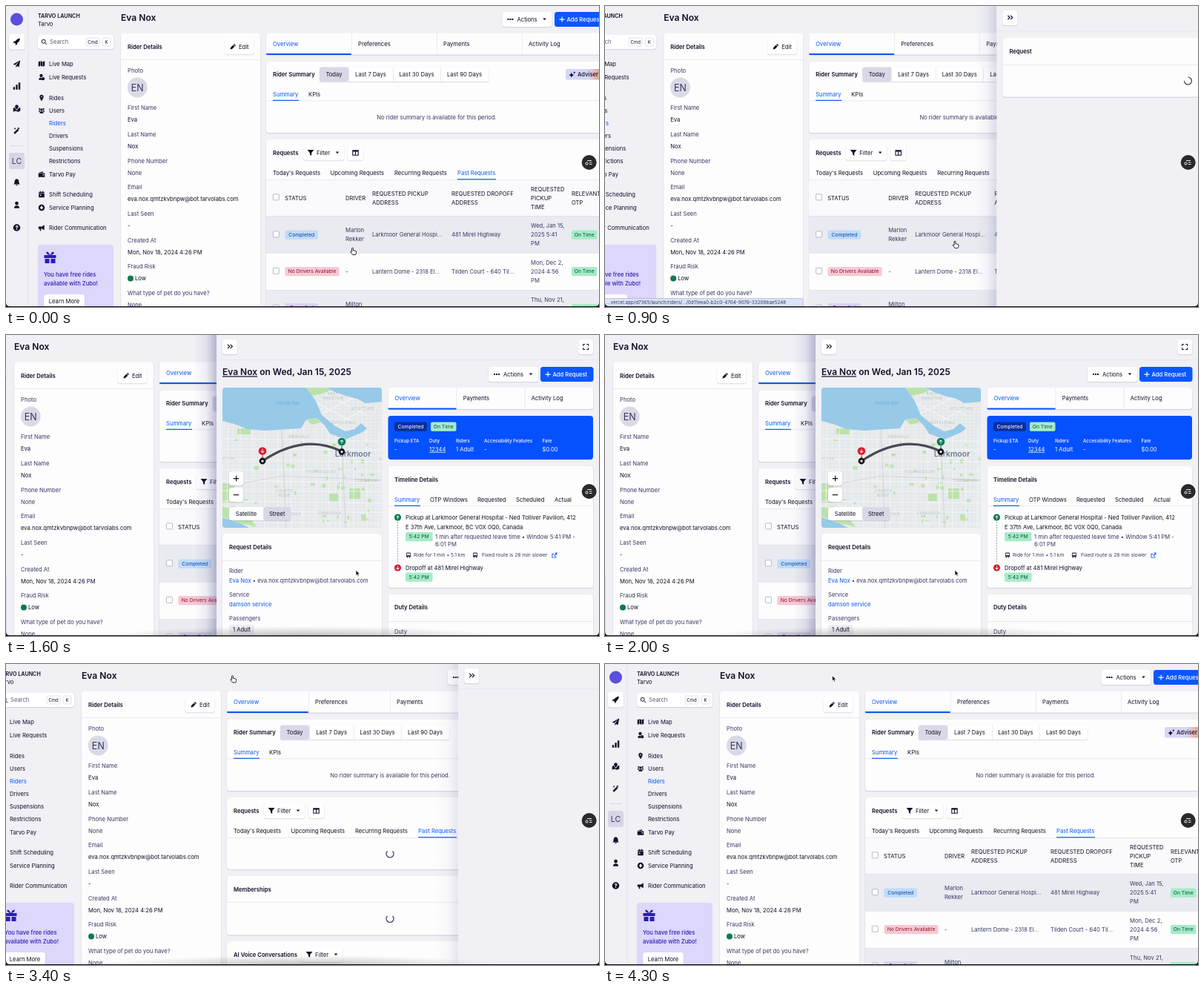
Recreate the animation shown at these times as an HTML page. Size 800 px wide and 406 px high, loop 4.4 s.

```html
<!DOCTYPE html>
<html lang="en">
<head>
<meta charset="utf-8">
<title>Rider details</title>
<style>
html, body { margin: 0; width: 100%; height: 100%; overflow: hidden; background: #f0f0f5; }
svg { display: block; width: 100vw; height: 100vh; }
text { font-family: Inter, "Open Sans", sans-serif; white-space: pre; }
</style>
</head>
<body>
<svg id="stage" viewBox="0 0 800 406" xmlns="http://www.w3.org/2000/svg"></svg>
<script>
const LOOP = 4400, STEP = 100, OPEN_X = 284, PUSH = 144;
const INK = '#0f1026', SOFT = '#36395f', BLUE = '#0b57f0', LINE = '#e1e2ea', BG = '#f0f0f5';
const NAME = 'Eva Nox', MAIL = 'eva.nox.qmtzkvbnpw@bot.tarvolabs.com';

const ICONS = {
  rocket: 'M15 1C10 1 7 4 5 7H2L0 11l3-.5 3 3L5 16l4-2v-3c3-2 6-5 6-10z',
  send: 'M16 0 0 9l4 2 9-8-7 9v4l3-3 4 2z',
  bars: 'M0 10h4v6H0zM6 5h4v11H6zM12 0h4v16h-4z',
  mapPin: 'M8 0a4 4 0 0 1 4 4q0 2-4 7Q4 6 4 4a4 4 0 0 1 4-4zM0 8l3-2 5 7 5-6 3-1v8l-5 2-6-2-5 2z',
  wand: 'M1 13 10 4l3 3-9 9zM12 0l1 2 2 1-2 1-1 2-1-2-2-1 2-1zM4 1l.8 1.7 1.7.8-1.700.8L4 6l-.8-1.700L1.500 3.500l1.700-.8z',
  bell: 'M8 0q5 1 5 7 0 3 2 5H1q2-2 2-5 0-6 5-7zM6 13h4q-2 4-4 0z',
  agent: 'M8 1a4 4 0 1 1 0 8 4 4 0 0 1 0-8zM2 16q0-6 6-6t6 6z',
  help: 'M8 0a8 8 0 1 1 0 16A8 8 0 0 1 8 0zM5 6h2q1-2 2 0L7 8v2h2V8.500Q12 7 11 4.500 8 1 5 4.500zM7 11v2h2v-2z',
  map: 'M0 3l5-2v12l-5 2zM6 1l4 2v12l-4-2zM11 3l5-2v12l-5 2z',
  live: 'M7 0a4 4 0 1 1 0 8 4 4 0 0 1 0-8zM1 15q0-6 6-6l2 6zM12 8a4 4 0 1 1 0 8 4 4 0 0 1 0-8z',
  pin: 'M8 0a5 5 0 0 1 5 5q0 3-5 11Q3 8 3 5a5 5 0 0 1 5-5zM8 3.500a1.500 1.500 0 1 0 0 3 1.500 1.500 0 0 0 0-3z',
  users: 'M8 3a3 3 0 1 1 0 6 3 3 0 0 1 0-6zM3 15q0-5 5-5t5 5zM3 2a2 2 0 1 1 0 4 2 2 0 0 1 0-4zM13 2a2 2 0 1 1 0 4 2 2 0 0 1 0-4zM0 11q0-4 4-4l1 2-2 2zM16 11q0-4-4-4l-1 2 2 2z',
  card: 'M0 4l11-3 1 3zM0 5h16v10H0zM11 8v3h3V8z',
  calendar: 'M1 2h3V0h2v2h4V0h2v2h3v3H1zM1 6h14v10H1zM4 9v3h3V9z',
  gear: 'M8 0a8 8 0 1 1 0 16A8 8 0 0 1 8 0zM8 3 4 8l4 5 4-5z',
  horn: 'M15 1v13l-6-3H6l1 5H4l-1-5H0V5h9z',
  gift: 'M0 5h16v4H0zM1 10h6v6H1zM9 10h6v6H9zM8 5Q2 4 3 1q2-2 5 4 3-6 5-4 1 3-5 4z',
  pencil: 'M1 15l1-5 7-7 4 4-7 7zM10 2l2-2 4 4-2 2z',
  filter: 'M0 1h16l-6 7v7l-4-3V8z',
  caret: 'M2 4h12l-6 7z',
  columns: 'M0 1h16v14H0zM2 5v8h5V5zM9 5v8h5V5z',
  spark: 'M6 3l2 4 4 2-4 2-2 4-2-4-4-2 4-2zM13 0l1 2 2 1-2 1-1 2-1-2-2-1 2-1z',
  bus: 'M3 0h10q2 0 2 3v10h-2v3h-3v-3H6v3H3v-3H1V3q0-3 2-3zM3 3v5h10V3z',
  ext: 'M9 0h7v7l-2-2-6 6-2-2 6-6zM0 3h6v2H2v9h9v-4h2v6H0z',
  expand: 'M0 0h6v2H2v4H0zM10 0h6v6h-2V2h-4zM0 10h2v4h4v2H0zM14 10h2v6h-6v-2h4z',
  plus: 'M7 0h2.500v7H16v2.500H9.500V16H7V9.500H0V7h7z',
  minus: 'M0 7h16v2.500H0z',
  dots: 'M0 6h4v4H0zM6 6h4v4H6zM12 6h4v4h-4z',
  up: 'M8 1l6 6-1.500 1.500L9 5v10H7V5L3.500 8.500 2 7z',
  down: 'M8 15l6-6-1.500-1.500L9 11V1H7v10L3.500 7.500 2 9z'
};

const rect = (x, y, w, h, fill, r = 0, more = '') =>
  `<rect x="${x}" y="${y}" width="${w}" height="${h}" rx="${r}" fill="${fill}" ${more}/>`;
const circle = (x, y, r, fill, more = '') => `<circle cx="${x}" cy="${y}" r="${r}" fill="${fill}" ${more}/>`;
const path = (d, stroke, w = 1, more = '') => `<path d="${d}" fill="none" stroke="${stroke}" stroke-width="${w}" ${more}/>`;
const shape = (d, fill) => `<path d="${d}" fill="${fill}"/>`;
// y is the middle of the line
const text = (x, y, s, { c = INK, z = 7.65, w = 400, a = 'start', more = '' } = {}) =>
  `<text x="${x}" y="${y + z * .364}" fill="${c}" font-size="${z}" font-weight="${w}" text-anchor="${a}" ${more}>${s}</text>`;
const bold = (x, y, s) => text(x, y, s, { w: 600 });
const icon = (n, x, y, s = 9, c = INK) =>
  `<path d="${ICONS[n]}" fill="${c}" fill-rule="evenodd" transform="translate(${x - s / 2} ${y - s / 2}) scale(${s / 16})"/>`;
const group = (id, body) => `<g id="${id}">${body}</g>`;
const hline = (x, y, w) => rect(x, y, w, .7, LINE);
const panel = (x, y, w, h, r = 4, fill = '#fdfdfe') =>
  rect(x - .4, y + .3, w + .8, h + 1, 'rgba(45,45,100,.13)', r) + rect(x, y, w, h, fill, r);
const button = (x, y, w, h = 20) => panel(x, y, w, h, 3.5, '#fff');
const badge = (x, y, w, s, fill, c) => rect(x, y - 6, w, 12.3, fill, 2) + text(x + w / 2, y, s, { c, z: 6.8, a: 'middle' });
const spinner = (x, y) => `<path class="spin" data-at="${x} ${y}" d="M0-5A5 5 0 1 1-5 0" fill="none" stroke="#35375c" stroke-width="1.2"/>`;
const chip = (x, y) => badge(x, y, 34.5, 'On Time', '#a5ecc8', '#0b5138');

function actions(x, y, dx) {
  return button(x, y, 67) + icon('dots', x + 11, y + 10, 8) + text(x + 20, y + 10, 'Actions') + icon('caret', x + 57, y + 10, 6) +
    rect(x + dx, y, 71.500, 20, '#0b57ff', 3.5) + icon('plus', x + dx + 10, y + 10, 7, '#fff') +
    text(x + dx + 16.500, y + 10, 'Add Request', { c: '#fff', w: 500 });
}
const filter = (x, y) => button(x, y, 55) + icon('filter', x + 10, y + 10, 9) + text(x + 18, y + 10, 'Filter') + icon('caret', x + 46, y + 10, 6);

function bigTabs(x, y, w, h, labels) {
  const step = w / labels.length;
  return panel(x, y, w, h) + labels.map((s, i) => text(x + 9 + step * i, y + h / 2, s, { c: i ? INK : BLUE }) +
    (i ? rect(x + step * i, y, .7, h, LINE) : '')).join('') + rect(x, y + h - 1.600, step, 2.200, BLUE, 1);
}
const tabs = (list, y, on, w) => list.map(([x, s], i) =>
  text(x, y, s, { c: i === on ? BLUE : INK }) + (i === on ? rect(x, y + 7.700, w, 1.200, BLUE) : '')).join('');

function sidebar() {
  const rail = [['send', 78], ['bars', 108], ['mapPin', 138], ['wand', 168], ['bell', 238], ['agent', 268], ['help', 299]];
  const menu = [['Live Map', 78, 'map'], ['Live Requests', 96, 'live'], ['Rides', 124, 'pin'], ['Users', 141, 'users'],
    ['Riders', 158], ['Drivers', 175], ['Suspensions', 192], ['Restrictions', 209], ['Tarvo Pay', 227, 'card'],
    ['Shift Scheduling', 254, 'calendar'], ['Service Planning', 272, 'gear'], ['Rider Communication', 299, 'horn']];
  const key = (x, w, s) => rect(x, 43, w, 11, '#fff', 2, `stroke="#d5d6e0" stroke-width=".7"`) + text(x + w / 2, 48.500, s, { z: 6, a: 'middle' });
  return rect(29.500, 0, .8, 406, '#e0e0ea') + circle(14.500, 18, 8.500, '#5b4fdb') +
    button(4, 37.500, 21, 21) + icon('rocket', 14.500, 48, 10) + rail.map(([n, y]) => icon(n, 14.500, y, 9.500)).join('') +
    rect(6, 188, 17, .8, '#cfd0dc') + rect(4, 198, 21, 22, '#d6d6e6', 3) + text(14.500, 209, 'LC', { z: 10.500, a: 'middle', c: SOFT }) +
    text(43, 13.500, 'TARVO LAUNCH', { z: 7.2, w: 600 }) + text(43, 24.500, 'Tarvo') +
    panel(43, 39, 102, 19, 4, '#fff') + circle(50.700, 47.800, 2.500, 'none', `stroke="${INK}"`) + path('M52.600 49.700l2.500 2.500', INK) +
    text(59, 48.500, 'Search', { c: '#5d607c' }) + key(108, 18, 'Cmd') + key(130, 11, 'K') +
    menu.map(([s, y, n]) => (n ? icon(n, 48, y, 8.500) : '') + text(58, y, s, { c: s === 'Riders' ? BLUE : INK })).join('') +
    rect(43, 322, 102, 90, '#dcd7fb', 4) + icon('gift', 59.500, 339, 16, '#2a1cb8') +
    text(51, 362.500, 'You have free rides', { c: '#2a1cb8', w: 500 }) + text(51, 374.500, 'available with Zubo!', { c: '#2a1cb8', w: 500 }) +
    button(51, 389, 55, 18) + text(78.500, 398, 'Learn More', { a: 'middle' });
}

function rider() {
  const rows = [['First Name', 'Eva', 137.500], ['Last Name', 'Nox', 173], ['Phone Number', 'None', 209], ['Email', MAIL, 244.500],
    ['Last Seen', '-', 280], ['Created At', 'Mon, Nov 18, 2024 4:26 PM', 316], ['Fraud Risk', 'Low', 351.500], ['What type of pet do you have?', 'None', 387]];
  return text(155, 15.500, NAME, { z: 12.100, w: 600 }) + panel(155, 36.500, 188, 380) + bold(164, 55, 'Rider Details') +
    button(295, 45, 39.500) + icon('pencil', 306, 55, 8) + text(314, 55, 'Edit') + hline(155, 72, 188) +
    text(164, 87, 'Photo', { c: SOFT }) + circle(177.300, 110, 13.400, '#dadae7') + text(177.300, 110.300, 'EN', { z: 12.500, a: 'middle', c: SOFT }) +
    rows.map(([k, v, y]) => text(164, y, k, { c: SOFT }) + text(v === 'Low' ? 174 : 164, y + 16, v, { c: v === 'None' ? SOFT : INK })).join('') +
    circle(168, 367.500, 4, '#0b7a53');
}

function table(w) {
  const x = 351, cols = [['STATUS', 376], ['DRIVER', 458], ['REQUESTED PICKUP|ADDRESS', 494], ['REQUESTED DROPOFF|ADDRESS', 601],
    ['REQUESTED|PICKUP|TIME', 708], ['RELEVANT|OTP', 763]];
  const lines = (x, y, s, c) => s.split('|').map((p, i, all) => text(x, y + (i - (all.length - 1) / 2) * 12, p, { c })).join('');
  const box = y => rect(360.400, y - 4.200, 8, 8, '#fff', 1, 'stroke="#a6a8ba" stroke-width=".8"');
  const row = (y, tag, driver, from, to, when) => box(y - .5) + badge(...tag) + lines(458, y, driver, SOFT) + lines(494, y, from, SOFT) +
    lines(601, y, to, SOFT) + lines(708, y, when, SOFT) + chip(763, y);
  return panel(x, 180, w, 240) + rect(x, 235, w, 48, '#fafafc') + rect(x, 283, w, 50, '#e9ebf1') + rect(x, 383, w, 30, '#ebecf2') +
    hline(x, 283, w) + hline(x, 333, w) + hline(x, 383, w) + box(258) + cols.map(([s, cx]) => lines(cx, 259, s, INK)).join('') +
    row(308.500, [376.500, 308.500, 44.500, 'Completed', '#bedcfb', '#123e9c'], 'Marlon|Rekker', 'Larkmoor General Hospi...', '481 Mirel Highway', 'Wed, Jan 15,|2025 5:41|PM') +
    row(358, [376.500, 358, 73, 'No Drivers Available', '#f8c8d3', '#8c1230'], '-', 'Lantern Dome - 2318 El...', 'Tilden Court - 640 Til...', 'Mon, Dec 2,|2024 4:56|PM') +
    row(408, [376.500, 407, 44.500, 'Cancelled', '#dcd3ee', '#4a2a78'], 'Milton|Bessor', 'Amber Place - 300 Gl...', 'Amber Place - 210 Gl...', 'Thu, Nov 21,|2024 2:30|PM');
}

function main(w, busy) {
  const x = 351, mid = x + w / 2;
  const spans = [['Today', 423, 39], ['Last 7 Days', 462, 60], ['Last 30 Days', 522, 64], ['Last 90 Days', 586, 65]];
  return actions(busy ? 649 : 669.500, 8, 70.500) + bigTabs(x, 36.500, w, 29, ['Overview', 'Preferences', 'Payments', 'Activity Log']) +
    panel(x, 75, w, 96) + bold(360, 92.500, 'Rider Summary') + button(423, 82.500, 228, 19.500) + rect(423, 82.500, 39, 19.500, '#d9d8e6', 3) +
    spans.map(([s, a, b], i) => text(a + b / 2, 92.300, s, { a: 'middle' }) + (i ? rect(a, 82.500, .7, 19.500, LINE) : '')).join('') +
    rect(x + w - 56, 85, 56, 14.500, 'url(#glow)', 2) + icon('spark', x + w - 47, 92.500, 9) + text(x + w - 40, 92.500, 'Adviser', { w: 500 }) +
    hline(x, 127.500, w) + tabs([[360, 'Summary'], [408, 'KPIs']], 119, 0, 35) +
    text(mid, 150, 'No rider summary is available for this period.', { a: 'middle', c: SOFT }) +
    (busy ? panel(x, 180, w, 97) : table(w)) +
    bold(360, 198.500, 'Requests') + filter(401, 188) + button(461, 188, 21) + icon('columns', 471.500, 198, 8.500) + hline(x, 234, w) +
    tabs([[360, "Today's Requests"], [437.500, 'Upcoming Requests'], [524, 'Recurring Requests'], [609, 'Past Requests']], 225.500, 3, 52) +
    (busy ? spinner(mid, 256) + panel(x, 285.500, w, 80) + bold(360, 304, 'Memberships') + hline(x, 321, w) + spinner(mid, 343.500) +
      panel(x, 374, w, 50) + bold(360, 392, 'AI Voice Conversations') + filter(452, 382) : '');
}

function cityMap() {
  let seed = 7, parks = '', roads = '';
  const rnd = () => (seed = seed * 16807 % 2147483647) / 2147483647;
  for (let i = 0; i < 50; i++) parks += rect(292 + rnd() * 212, 140 + rnd() * 118, 2 + rnd() * 5, 2 + rnd() * 4, '#bfe3b0', .6);
  for (let i = 0; i < 13; i++) roads += `M${299 + i * 17} 124l${i % 3 - 1} 138`;
  for (let i = 0; i < 9; i++) roads += `M290 ${140 + i * 14}l220 ${3 - i % 2 * 2}`;
  const area = (x, y, s) => text(x, y, s, { z: 5.200, c: '#858893', a: 'middle', more: 'letter-spacing=".35"' });
  const pin = (x, y, c, n) => path(`M${x} ${y}v-10`, c, 1.200) + circle(x, y - 13.500, 5.600, c, 'stroke="#fff" stroke-width=".5"') +
    icon(n, x, y - 13.500, 6.500, '#fff') + circle(x, y, 3, '#fff', 'stroke="#17171c" stroke-width="2.800"');
  const sea = '#96cae8', wood = '#bce2ab';
  return `<g clip-path="url(#mapClip)">` + rect(292, 71, 215, 189, '#e5e8ea') + rect(292, 71, 215, 189, 'url(#blocks)') + parks +
    rect(292, 200, 16, 26, wood) + rect(312, 126, 18, 8, wood) + rect(463, 207, 15, 14, wood) + rect(435, 214, 13, 10, wood) +
    path(roads, '#f7f8f9', .8) + path('M292 205L372 190 507 196M372 128L378 260M453 140L458 260', '#d2d7dc', 1.200) +
    path('M420 92L470 118M432 80L486 108M426 106L470 84M444 122L490 96', '#fafbfb', .9) +
    shape('M292 71H405L418 89 426 108 444 123 458 130 470 127 479 119 487 126 481 131 458 141 437 133 430 122 419 112 405 114 398 126 379 127 350 129 326 127 308 120 292 116z', sea) +
    shape('M432 71H507V90L485 92 474 86 458 82 444 77z', sea) + shape('M292 246L316 254 332 262H292z', sea) +
    shape('M405 71H432L438 75 424 80 413 82z', wood) + shape('M405 114L419 112 424 118 412 121z', wood) + shape('M292 232L326 236 336 258 316 254 292 245z', wood) +
    group('areas', text(380, 92, 'Harrow Bay', { z: 5.800, c: '#4f86b3', a: 'middle', more: 'font-style="italic"' }) +
      area(441, 79, 'EAST') + area(441, 85, 'HARBOUR') + area(481, 99, 'MILLTOWN') + area(455, 118, 'DOVETOWN') + area(396, 137, 'MERIVALO') +
      area(425, 184, 'THORNESBURY') + area(487, 196, 'TOBIN PARK') + area(375, 210, 'JUNIPER') + area(375, 216, 'RIDGE') +
      area(380, 241, 'PELLARDALE') + area(437, 240, 'FERNRIDGE') + area(300, 166, 'nt Lea')) +
    text(468, 160.500, 'Larkmoor', { z: 10.600, c: '#5c6c8c', w: 500, a: 'middle' }) +
    path('M346 170Q402 132 453 157', '#484955', 3.200) + pin(346, 170, '#d3202f', 'down') + pin(453, 157.500, '#0b7a53', 'up') + '</g>' +
    button(301, 184, 19, 19) + icon('plus', 310.500, 193.500, 7.500) + button(301, 206, 19, 19) + icon('minus', 310.500, 215.500, 7.500) +
    button(301, 232, 83.500, 18) + rect(347, 232, 37.500, 18, '#d9d8e6', 3) +
    text(324, 241, 'Satellite', { a: 'middle' }) + text(365.700, 241, 'Street', { a: 'middle' });
}

function detail() {
  const facts = [['Pickup ETA', '-', 524], ['Duty', '12344', 571], ['Riders', '1 Adult', 607], ['Accessibility Features', '-', 645], ['Fare', '$0.00', 723.500]];
  const tiny = { z: 6.700, c: SOFT };
  const stop = (y, c, n) => circle(528.500, y, 4.600, c) + icon(n, 528.500, y, 6, '#fff');
  const hour = y => badge(539, y, 36.500, '5:42 PM', '#a5ecc8', '#0b5138');
  return text(292, 50, `<tspan text-decoration="underline">${NAME}</tspan> on Wed, Jan 15, 2025`, { z: 12, w: 600 }) + actions(651, 43, 70) + cityMap() +
    panel(292, 268, 215, 150) + bold(301, 286, 'Request Details') + hline(292, 304, 215) +
    text(301, 318, 'Rider', { c: SOFT }) + text(301, 331, `<tspan fill="${BLUE}">${NAME}</tspan> • ${MAIL}`, { c: SOFT }) +
    text(301, 350, 'Service', { c: SOFT }) + text(301, 363, 'damson service', { c: BLUE }) + text(301, 382, 'Passengers', { c: SOFT }) +
    rect(301, 391, 34, 13, '#ececf2', 3) + text(318, 397.500, '1 Adult', { a: 'middle' }) +
    bigTabs(515.500, 71, 276.500, 29, ['Overview', 'Payments', 'Activity Log']) +
    rect(515.500, 109, 276.500, 59, '#0550ff', 4) + badge(524, 123.500, 44, 'Completed', '#0b2f99', '#fff') + chip(573, 123.500) +
    facts.map(([k, v, x]) => text(x, 143, k, { c: '#fff', z: 6.200, w: 500 }) +
      text(x, 154, v, { c: '#fff', more: k === 'Duty' ? 'text-decoration="underline"' : '' })).join('') +
    panel(515.500, 177, 276.500, 164) + bold(524, 195.500, 'Timeline Details') + hline(515.500, 230.500, 276.500) +
    tabs([[524, 'Summary'], [572, 'OTP Windows'], [636, 'Requested'], [688, 'Scheduled'], [740, 'Actual']], 222, 0, 35) +
    path('M528.500 252V308', '#8d90a8', .8, 'stroke-dasharray="2 1.500"') + stop(246, '#0b7a53', 'up') + stop(314, '#d3202f', 'down') +
    text(539, 246, 'Pickup at Larkmoor General Hospital - Ned Tolliver Pavilion, 412') + text(539, 259.500, 'E 37th Ave, Larkmoor, BC V0X 0Q0, Canada') +
    hour(272) + text(579, 272, '1 min after requested leave time • Window 5:41 PM -', { c: SOFT }) + text(579, 282.500, '6:01 PM', { c: SOFT }) +
    icon('bus', 543, 297, 7, SOFT) + text(550, 297, 'Ride for 1 min • 5.1 km', tiny) + icon('bus', 633, 297, 7, SOFT) +
    text(642, 297, 'Fixed route is 28 min slower', tiny) + icon('ext', 740, 297, 7, BLUE) +
    text(539, 314, 'Dropoff at 481 Mirel Highway') + hour(326.500) +
    panel(515.500, 350, 276.500, 70) + bold(524, 367.500, 'Duty Details') + hline(515.500, 386, 276.500) + text(524, 400, 'Duty', { c: SOFT });
}

function drawer() {
  return group('edge', rect(254, 0, 30, 406, 'url(#shade)')) + rect(284, 0, 520, 406, BG) + hline(284, 33.500, 520) +
    group('closeBox', button(292, 6, 20)) + path('M299 12.800l2.700 2.700-2.700 2.700M302.700 12.800l2.700 2.700-2.700 2.700', INK, 1.200) +
    button(772.500, 6, 19.500) + icon('expand', 782.200, 16, 8) +
    group('waiting', panel(292, 42.500, 500, 80) + bold(301, 61, 'Request') + hline(292, 79, 500) + spinner(542, 101)) + group('detail', detail());
}

const stage = document.getElementById('stage');
stage.innerHTML = `<defs>
  <linearGradient id="shade"><stop offset="0" stop-color="#3f3f85" stop-opacity="0"/><stop offset=".55" stop-color="#3f3f85" stop-opacity=".09"/><stop offset="1" stop-color="#3f3f85" stop-opacity=".34"/></linearGradient>
  <linearGradient id="glow"><stop offset=".55" stop-color="#d8d6f6"/><stop offset=".74" stop-color="#f0a9a4"/><stop offset=".85" stop-color="#8fd08a"/></linearGradient>
  <radialGradient id="haze"><stop offset="0" stop-color="#222" stop-opacity=".3"/><stop offset="1" stop-color="#222" stop-opacity="0"/></radialGradient>
  <pattern id="blocks" width="6" height="4.500" patternUnits="userSpaceOnUse"><path d="M0 0H6M0 0V4.500" stroke="#f4f5f6" stroke-width=".8"/></pattern>
  <clipPath id="mapClip"><rect x="292" y="71" width="215" height="189" rx="4"/></clipPath></defs>` +
  rect(0, 0, 800, 406, BG) +
  group('page', sidebar() + rider() + group('ready', main(460, false)) + group('busy', main(440, true))) +
  group('drawer', drawer()) +
  circle(786.700, 211, 10, '#29292d') + circle(783.500, 212.500, 1.600, 'none', 'stroke="#fff"') + path('M784 208.500h6M787 211h3.500M787 213.500h3.500', '#fff', .9) +
  group('dock', '<ellipse cx="400" cy="407" rx="270" ry="14" fill="url(#haze)"/>') +
  group('status', rect(-3, 394.500, 270, 14, '#dde3f8', 2, 'stroke="#a9b1d2" stroke-width=".7"') +
    text(2, 400, '...vercel.app/d7365/launch/riders/.../0d11eea0-b2c0-4704-9076-33208bae5248', { z: 6.350, c: '#33365c' })) +
  shape('M0 400Q0 405 5 405H795Q800 405 800 400V406H0z', '#0c0c12') +
  group('cursor', `<path id="hand" d="M-.9.7Q0-.8.9.7V3.800L2.300 3.900 3.700 4.300 5 5V7Q5 8.500 4 9.500H.2Q-1 7.800-3 5.800-2.500 4.300-.9 5.600z" fill="#fff" stroke="#111" stroke-width=".9"/>` +
    `<path id="arrow" d="M0 0V7.500L1.700 6 2.900 8.600 4.200 8 3.100 5.500H5.300z" fill="#111" stroke="#fff" stroke-width=".7"/>`);

const el = Object.fromEntries([...stage.querySelectorAll('g[id], path[id]')].map(n => [n.id, n]));
const spins = [...stage.querySelectorAll('.spin')];
const show = (n, on) => n.setAttribute('display', on ? 'inline' : 'none');
const move = (n, x, y) => n.setAttribute('transform', `translate(${x} ${y})`);
const span = (t, a, b) => Math.min(1, Math.max(0, (t - a) / (b - a)));
const smooth = k => k * k * (3 - 2 * k);

// CSS "ease": cubic-bezier(.25, .1, .25, 1)
function ease(x) {
  let lo = 0, hi = 1, u = x;
  for (let i = 0; i < 24; i++) {
    u = (lo + hi) / 2;
    if (.75 * u * (1 - u) ** 2 + .75 * u * u * (1 - u) + u ** 3 < x) lo = u; else hi = u;
  }
  return x <= 0 ? 0 : x >= 1 ? 1 : .3 * u * (1 - u) ** 2 + 3 * u * u * (1 - u) + u ** 3;
}

function draw(t) {
  const open = ease(span(t, 808, 1108)) - ease(span(t, 3290, 3590));
  const loaded = t >= 1500, reload = t >= 3300 && t < 3900;
  move(el.page, -PUSH * open, 0);
  show(el.drawer, open > 0);
  move(el.drawer, (800 - OPEN_X) * (1 - open), 0);
  el.edge.setAttribute('opacity', open);
  show(el.waiting, !loaded);
  show(el.detail, loaded && t < 3300);
  show(el.closeBox, t < 3000 || t >= 3300);
  show(el.ready, !reload);
  show(el.busy, reload);
  show(el.dock, t >= 1000 && t < 3700);
  show(el.status, t >= 500 && t < 1600);
  el.areas.setAttribute('opacity', .45 + .55 * span(t, 2000, 2400));

  const nudge = smooth(span(t, 100, 500)), go = smooth(span(t, 2400, 3100));
  move(el.cursor, 467.500 + 4.500 * nudge - 166.500 * go + span(t, 3500, 3700), 326 - 9 * nudge - 301.500 * go);
  const hand = t < 1500 || (t >= 3000 && t < 3500);
  show(el.hand, hand);
  show(el.arrow, !hand);
  for (const s of spins) s.setAttribute('transform', `translate(${s.dataset.at}) rotate(${(t - 900) * .45})`);
}

const start = performance.now();
function tick() {
  const t = (performance.now() - start) % LOOP;
  draw(Math.floor(t / STEP) * STEP);
  requestAnimationFrame(tick);
}
tick();
</script>
</body>
</html>
```
